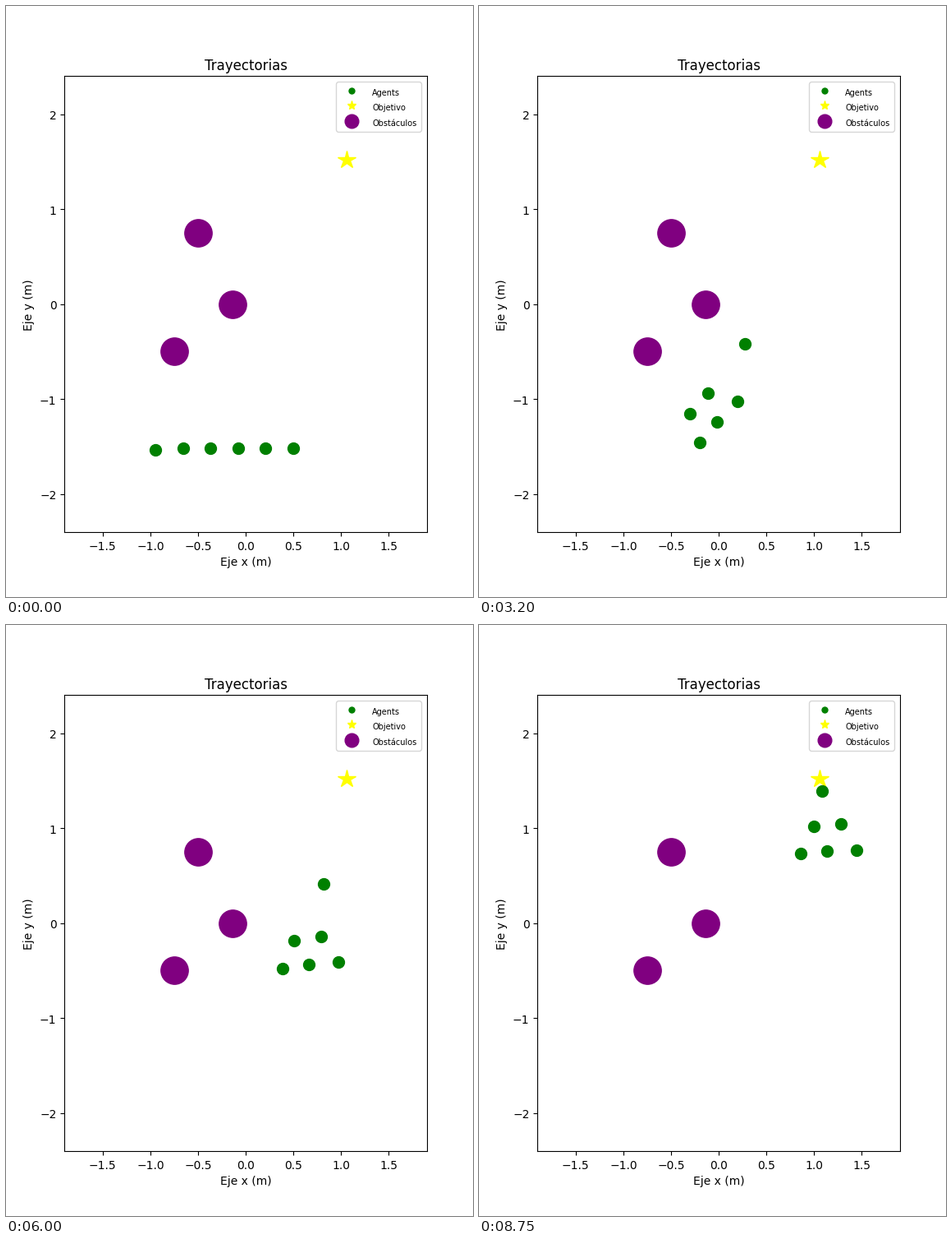
Recreate the animation shown at these times as a matplotlib script. Size 569 px wide and 719 px high, loop 8800 ms.

```python
import numpy as np
import matplotlib.pyplot as plt
from matplotlib.animation import FuncAnimation
from matplotlib.transforms import ScaledTranslation

W, H, DPI = 569, 719, 100
FRAMES, STEP_MS = 176, 50
LEFT, RIGHT, BOTTOM, TOP = 71.24, 512.98, 79.2, 633.59
XLIM, YLIM = (-1.9, 1.9), (-2.4, 2.4)

# Key points (step, x, y) in stage pixels: the leader and the flock's centre.
LEADER = [(0, 182, 540), (27, 224, 479), (47, 286, 422), (54, 306, 420), (80, 340, 389),
          (120, 387, 315), (142, 406, 271), (162, 416, 212), (175, 418, 202)]
FLOCK = [(0, 282, 538), (27, 269, 538), (47, 268, 515), (80, 303, 477),
         (120, 369, 401), (142, 398, 350), (175, 425, 263)]

# Followers go from an even row to a two-row wedge around the centre.
ROW = np.linspace(-66, 68, 5)
WEDGE = np.array([-17 - 18j, 16 - 21j, -1 + 12j, -33 + 15j, 35 + 11j])
GATHER, SWIRL = 47, 125  # steps until the wedge is formed / stops turning


def along(t, points):
    """Smooth cubic curve through the key points, as x + iy."""
    keys, x, y = np.array(points, float).T
    p = x + 1j * y
    v = np.gradient(p, keys)
    i = np.clip(np.searchsorted(keys, t, side="right") - 1, 0, len(keys) - 2)
    h = keys[i + 1] - keys[i]
    u = (t - keys[i]) / h
    return ((1 + 2 * u) * (1 - u) ** 2 * p[i] + u * (1 - u) ** 2 * h * v[i]
            + u * u * (3 - 2 * u) * p[i + 1] + u * u * (u - 1) * h * v[i + 1])


def agents_at(t):
    gather = np.sin(np.pi / 2 * min(t / GATHER, 1))
    turn = -np.pi / 2 * max(1 - t / SWIRL, 0)
    offsets = (1 - gather) * ROW + gather * WEDGE * np.exp(1j * turn)
    return np.append(along(t, LEADER), along(t, FLOCK) + offsets)


def to_axis(pix, lo, hi, lim):
    return lim[0] + (pix - lo) / (hi - lo) * (lim[1] - lim[0])


fig, ax = plt.subplots(figsize=(W / DPI, H / DPI), dpi=DPI)
fig.subplots_adjust(left=LEFT / W, right=RIGHT / W, bottom=BOTTOM / H, top=TOP / H)
ax.set(xlim=XLIM, ylim=YLIM, title="Trayectorias",
       xlabel="Eje x (m)", ylabel="Eje y (m)")

agents, = ax.plot([], [], "o", color="green", ms=10, zorder=3, label="Agents")
ax.plot(1.06, 1.52, "*", color="yellow", ms=16, label="Objetivo")
ax.plot([-0.5, -0.135, -0.75], [0.75, 0, -0.5], "o", color="purple", ms=24,
        label="Obstáculos")
legend = ax.legend(loc="upper right", markerscale=0.5)
plt.setp(legend.get_texts(), fontsize=7)

# Text sits one pixel lower than the default layout.
drop = ScaledTranslation(0, -1 / DPI, fig.dpi_scale_trans)
for text in [ax.title, ax.yaxis.label, *ax.get_xticklabels(),
             *ax.get_yticklabels(), *legend.get_texts()]:
    text.set_transform(text.get_transform() + drop)


def update(i):
    pos = agents_at(i)
    agents.set_data(to_axis(pos.real, LEFT, RIGHT, XLIM),
                    to_axis(H - pos.imag, BOTTOM, TOP, YLIM))
    return agents,


anim = FuncAnimation(fig, update, frames=FRAMES, interval=STEP_MS,
                     repeat=True, repeat_delay=0)
plt.show()
```
